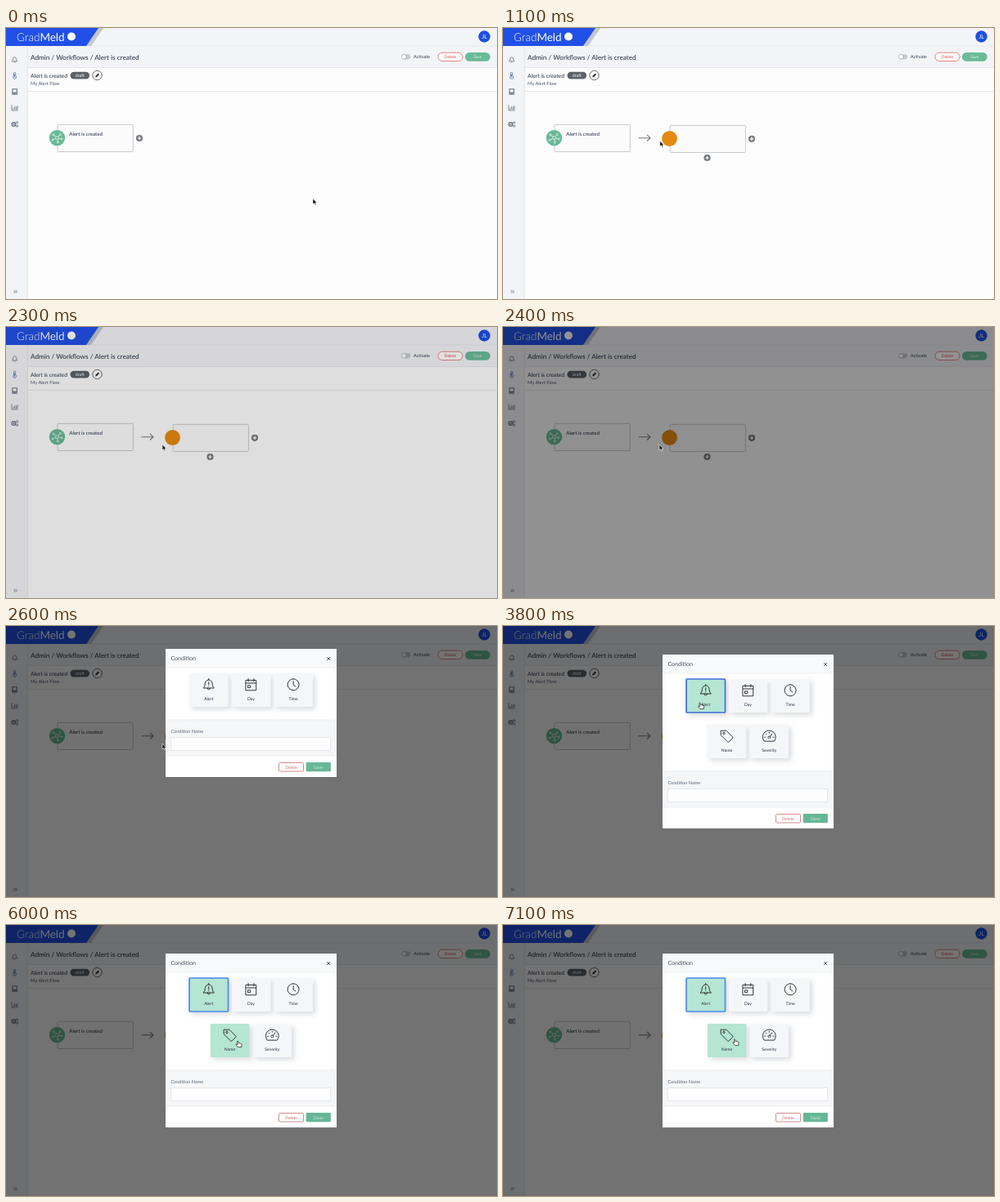
An HTML page that plays this animation: 600x332 px, repeating every 8 s.

```html
<!DOCTYPE html>
<html lang="en">
<head>
<meta charset="utf-8">
<title>Workflow editor</title>
<style>
  html, body { margin: 0; width: 100%; height: 100%; overflow: hidden; }
  svg { display: block; width: 600px; height: 332px; }
  text { font-family: Lato, "Open Sans", sans-serif; fill: #323c4d; text-rendering: geometricPrecision; }
  .mid { text-anchor: middle; }
  .m { font-weight: 500; }
  .line { fill: none; stroke: #667186; stroke-width: .8; stroke-linecap: round; stroke-linejoin: round; }
  .icon { fill: none; stroke: #2a2d31; stroke-width: .95; stroke-linecap: round; stroke-linejoin: round; }
  .node { fill: #fbfbfb; stroke: #c3c5c8; stroke-width: .9; }
  .card rect { filter: drop-shadow(3px 3px 3px rgba(30, 40, 60, .17)); }
  .pointer { fill: #111; stroke: #fff; stroke-width: .6; }
  .hand { fill: #fff; stroke: #111; stroke-width: .7; stroke-linejoin: round; }
</style>
</head>
<body>
<svg viewBox="0 0 600 332">
  <defs>
    <g id="plus">
      <circle r="4.1" fill="#75797e"/>
      <path d="M-2.2 0H2.2M0 -2.2V2.2" stroke="#fff" stroke-width="1.2"/>
    </g>
  </defs>

  <rect width="600" height="332" fill="#fdfdfd"/>
  <rect width="600" height="48.5" fill="#f3f4f7"/>
  <rect y="22" width="26" height="310" fill="#f3f4f7"/>
  <path d="M0 22H600M26.5 48.5H600M26.5 77.5H600M26.3 22V332" stroke="#e2e4e9" stroke-width=".8"/>

  <!-- header -->
  <path d="M106 0H119L104 22H91Z" fill="#c3c7d0"/>
  <path d="M0 0H113L98 22H0Z" fill="#2150e6"/>
  <text x="13" y="16.2" font-size="13.5" style="fill:#fff"><tspan font-weight="300">Grad</tspan>Meld</text>
  <circle cx="80" cy="10.5" r="5" fill="#fff"/>
  <circle cx="584.5" cy="10.5" r="7.2" fill="#1d4fe0"/>
  <text class="mid" x="584.5" y="13.1" font-size="7.1" style="fill:#fff">JL</text>

  <!-- sidebar -->
  <g class="line">
    <path d="M7.6 40.6Q8.6 39.6 8.6 38A2 2.2 0 0 1 12.6 38Q12.6 39.6 13.6 40.6ZM10 41.9H11.2"/>
    <path d="M9.5 58.6V55.4A1.1 1.1 0 0 1 11.7 55.4V58.6A2 2 0 1 1 9.5 58.6ZM10.6 57V60.4" stroke="#4f70b4"/>
    <path d="M7.9 74.7H13.3V81.3H7.9ZM7.9 79.4H13.3M10.2 80.4H11" stroke-width="1.1"/>
    <path d="M7 94.6V101H14.4M9 99.6V98M10.8 99.6V96M12.6 99.6V97M14 99.6V95.4"/>
    <circle cx="9.3" cy="118" r="2.3" stroke-width="1.2"/>
    <circle cx="9.3" cy="118" r=".6"/>
    <circle cx="13.4" cy="115.9" r="1.2"/>
    <circle cx="13.4" cy="120.1" r="1.2"/>
    <path d="M9.8 321.3L11.3 323L9.8 324.7M12 321.3L13.5 323L12 324.7"/>
  </g>

  <!-- title bars -->
  <text class="m" x="30" y="38.8" font-size="8.2">Admin / Workflows / Alert is created</text>
  <rect x="483.2" y="32.2" width="11" height="6.2" rx="3.1" fill="#c6c9ce"/>
  <circle cx="486.3" cy="35.3" r="2.8" fill="#fff" stroke="#9a9ea6" stroke-width=".6"/>
  <text x="498" y="37.4" font-size="5.5">Activate</text>
  <rect x="528" y="30.2" width="30" height="10.3" rx="5.1" fill="#fff" stroke="#df6a64" stroke-width=".8"/>
  <text class="mid m" x="543" y="37.2" font-size="4.9" style="fill:#d9534f">Delete</text>
  <rect x="561" y="30" width="30.7" height="10.8" rx="5.4" fill="#6abb98"/>
  <text class="mid m" x="576.4" y="37.2" font-size="4.9" style="fill:#d5efe3">Save</text>
  <text class="m" x="30" y="61" font-size="6.75">Alert is created</text>
  <rect x="78.5" y="53.7" width="23.6" height="8.8" rx="4.4" fill="#5b6269"/>
  <text class="mid" x="90.3" y="59.9" font-size="5.3" style="fill:#fff">draft</text>
  <circle cx="111.5" cy="58" r="5.7" fill="#fff" stroke="#444" stroke-width=".8"/>
  <path d="M109.2 60.4L109.7 58.5L112.6 55.6L114 57L111.1 59.9Z" fill="#333"/>
  <text x="30" y="70.4" font-size="5.75" style="fill:#4d576a">My Alert Flow</text>

  <!-- flow -->
  <rect class="node" x="63" y="118.3" width="92.3" height="33.2" rx="1"/>
  <circle cx="62.5" cy="134.6" r="9.7" fill="#68b996"/>
  <g stroke="#e9f7f0" stroke-width=".8" fill="#68b996">
    <path d="M62.5 134.6L58 130.8M62.5 134.6L66.4 130.4M62.5 134.6L68 135.8M62.5 134.6L57 137.2M62.5 134.6L63.4 140"/>
    <circle cx="62.5" cy="134.6" r="1.9"/><circle cx="58" cy="130.8" r="1"/><circle cx="66.4" cy="130.4" r="1"/>
    <circle cx="68" cy="135.8" r="1"/><circle cx="57" cy="137.2" r="1"/><circle cx="63.4" cy="140" r="1"/>
  </g>
  <text class="m" x="77.3" y="132.4" font-size="6.1">Alert is created</text>
  <use id="add" href="#plus" x="163" y="135"/>
  <g id="next">
    <path d="M165.5 134.7H180M176 130.9L180 134.7L176 138.5" fill="none" stroke="#777b80" stroke-width="1.1"/>
    <rect class="node" x="204.2" y="119.3" width="92.2" height="33.2" rx="1"/>
    <circle cx="203.5" cy="135.5" r="9.4" fill="#e58a11"/>
    <use href="#plus" x="304" y="135.8"/>
    <use href="#plus" x="249.5" y="159"/>
  </g>

  <rect id="shade" width="600" height="332"/>

  <!-- dialog, y measured from its top edge -->
  <g id="dialog">
    <rect id="panel" x="195" width="209" fill="#fff"/>
    <rect x="195" width="209" height="23" fill="#f8f9fa"/>
    <path d="M195 23H404" stroke="#e6e8ec" stroke-width=".6"/>
    <text x="201.4" y="14.3" font-size="7.1" style="fill:#454f60">Condition</text>
    <path d="M392.3 10.2L396 13.9M396 10.2L392.3 13.9" stroke="#444" stroke-width="1"/>
    <g id="cards"></g>
    <g id="form">
      <rect x="195" y="87" width="209" height="44" fill="#f5f6f8"/>
      <path d="M195 87H404M195 131H404" stroke="#e3e6ea" stroke-width=".6"/>
      <text x="201.4" y="102.8" font-size="5.55" style="fill:#5b6678">Condition Name</text>
      <rect x="201.5" y="108.5" width="195" height="16" fill="#fdfdfe" stroke="#e1e4e9" stroke-width=".8"/>
      <rect x="333.5" y="139.5" width="30" height="10.5" rx="1" fill="#fff" stroke="#cf7f7f" stroke-width=".9"/>
      <text class="mid" x="348.5" y="146.5" font-size="5" style="fill:#c9605f">Delete</text>
      <rect x="366.7" y="139" width="30.2" height="11.2" rx="1" fill="#67b797"/>
      <text class="mid" x="381.9" y="146.5" font-size="5" style="fill:#d3ebdf">Done</text>
    </g>
  </g>

  <path id="arrow" class="pointer" d="M0 0V7L1.6 5.5L2.8 8.1L4 7.6L2.9 5.1H5Z"/>
  <path id="hand" class="hand" d="M-1.6 -3.6Q-.9 -4.4 -.3 -3.4L.5 -1Q1.3 -1.8 1.9 -.9Q2.7 -1.4 3.2 -.4Q4 -.5 4.1 .6L3.6 3.6H-.6L-3 1Q-3.3 -.2 -1.9 0L-.9 .7Z"/>
</svg>

<script>
const $ = id => document.getElementById(id);

// Icons are centred on 0,0.
const icons = {
  Alert: "M-6.3 4Q-4.4 2.4 -4.4 -1A4.4 4.8 0 0 1 4.4 -1Q4.4 2.4 6.3 4ZM-1.6 4.2A1.6 2 0 0 0 1.6 4.2M0 -5.8V-7.4M0 -3.2V.2M0 2V2.1",
  Day: "M-6.2 -5.4H6.2V7H-6.2ZM-6.2 -1.8H6.2M-3.4 -7.2V-4M3.4 -7.2V-4M-3.6 1H-.8V3.8H-3.6Z",
  Time: "M0 -7A7 7 0 1 1 0 7A7 7 0 1 1 0 -7M0 -4.2V.3L2.8 2.2",
  Name: "M-7 -6.6H-.6L7.2 1.2Q7.9 1.9 7.2 2.6L2.4 7.2Q1.8 7.8 1.1 7.2L-7 -.8ZM-3.6 -4.6A1.2 1.2 0 1 1 -3.6 -2.2A1.2 1.2 0 1 1 -3.6 -4.6",
  Severity: "M-6.4 6A8 8 0 1 1 6.4 6ZM-.8 3A1.5 1.5 0 1 1 .8 3M.6 1L3.6 -2.8M-5.6 1.4H-4.6M-4 -2.8L-3.3 -2.1M0 -4.6V-3.6M5.6 1.4H4.6"
};

function card(name, x, y) {
  $("cards").innerHTML += `<g class="card" id="${name}" transform="translate(${x} ${y})">
    <rect width="47.5" height="41" rx="1" fill="#f5f6f8"/>
    <path class="icon" d="${icons[name]}" transform="translate(23.7 13.8)"/>
    <text class="mid m" x="23.7" y="33.4" font-size="5.1">${name}</text></g>`;
}
card("Alert", 224, 30);
card("Day", 275.8, 30);
card("Time", 327.4, 30);
card("Name", 249.8, 86);
card("Severity", 301.6, 86);

// time, x, y
const path = [
  [100, 375, 209], [650, 162, 134], [900, 170, 137], [1500, 254, 142],
  [1800, 241, 143], [2000, 191, 144], [2900, 191, 144], [3400, 241.5, 98],
  [4000, 241.5, 98], [4700, 263.8, 132], [5100, 263.8, 132], [5700, 284, 146],
  [6500, 284, 146], [7000, 284, 143.7]
];

const ramp = (t, a, b) => Math.min(1, Math.max(0, (t - a) / (b - a)));
const smooth = u => u * u * (3 - 2 * u);
const mix = (a, b, u) => a + (b - a) * u;
const show = (id, on) => $(id).style.display = on ? "" : "none";

function cursorAt(t) {
  const i = path.findIndex(p => p[0] > t);
  if (i === 0) return path[0].slice(1);
  if (i < 0) return path[path.length - 1].slice(1);
  const [a, ax, ay] = path[i - 1], [b, bx, by] = path[i];
  const u = smooth(ramp(t, a, b));
  return [mix(ax, bx, u), mix(ay, by, u)];
}

function tint(name, u) {
  const c = [mix(245, 181, u), mix(246, 229, u), mix(248, 211, u)].map(Math.round);
  $(name).firstElementChild.style.fill = `rgb(${c})`;
}

function draw(t) {
  const added = t >= 800, grown = t >= 3500;
  show("add", !added);
  show("next", added);

  $("shade").setAttribute("opacity", 0.55 * ramp(t, 2260, 2440));
  const left = (1 - ramp(t, 2400, 2700)) ** 2;
  $("dialog").setAttribute("transform", `translate(0 ${35 - 63 * left})`);
  $("dialog").setAttribute("opacity", ramp(t, 2400, 2600));
  $("panel").setAttribute("height", grown ? 213 : 157);
  $("form").setAttribute("transform", `translate(0 ${grown ? 56 : 0})`);
  show("Name", grown);
  show("Severity", grown);

  tint("Alert", ramp(t, 3200, 3400));
  tint("Name", ramp(t, 4800, 5200));
  const edge = $("Alert").firstElementChild.style;
  edge.stroke = grown ? (t < 3900 ? "#3f6edb" : "#4a8bf0") : "none";
  edge.strokeWidth = 1.7;

  const [x, y] = cursorAt(t);
  const hand = (t >= 600 && t < 900) || t >= 3200;
  show("hand", hand);
  show("arrow", !hand);
  $(hand ? "hand" : "arrow").setAttribute("transform", `translate(${x} ${y})`);
}

const start = performance.now();
function tick() {
  const t = (performance.now() - start) % 8000;
  draw(Math.floor(t / 100) * 100);
  requestAnimationFrame(tick);
}
tick();
</script>
</body>
</html>
```
